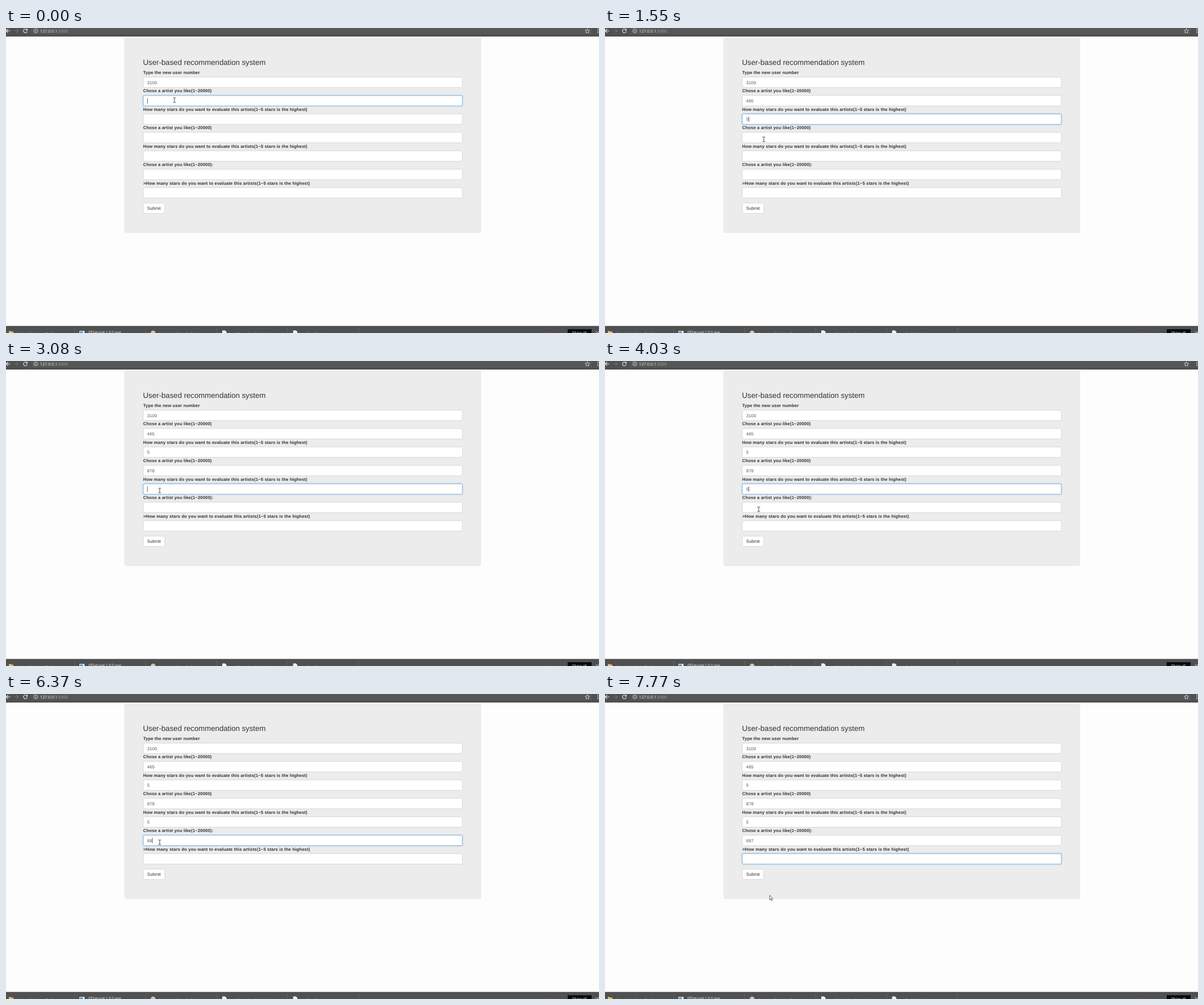
An HTML page for the animation above (8 s loop, 1042x537 px).

```html
<!DOCTYPE html>
<html lang="en">
<head>
<meta charset="utf-8">
<title>Recommendation form</title>
<style>
html, body { margin: 0; width: 100%; height: 100%; overflow: hidden; background: #fdfdfd; }
svg { display: block; width: 100vw; height: 100vh; }
text { font-family: "Liberation Sans", Arial, sans-serif; text-rendering: geometricPrecision; white-space: pre; }
.title { font-size: 13.2px; fill: #333; }
.label { font-size: 7.7px; font-weight: bold; letter-spacing: .115px; fill: #333; }
.value { font-size: 7.7px; letter-spacing: .12px; fill: #555; }
.button { font-size: 7.7px; fill: #333; }
.ui { font-family: "Open Sans", "Noto Sans", sans-serif; }
.url { font-size: 7.2px; fill: #f5f5f5; }
.file { font-size: 6.6px; fill: #f0f0f0; }
.icon { fill: none; stroke: #e6e6e6; stroke-width: 1.1; }
</style>
</head>
<body>
<svg id="stage" viewBox="0 0 1042 537" preserveAspectRatio="none">
  <defs>
    <filter id="blur" x="-5%" y="-50%" width="110%" height="200%"><feGaussianBlur stdDeviation="1"/></filter>
  </defs>
  <rect width="1042" height="537" fill="#fdfdfd"/>

  <g id="toolbar">
    <rect width="1042" height="15" fill="#505050"/>
    <rect x="44.5" y="-4" width="985" height="15" rx="1.5" fill="#575757"/>
    <rect y="14" width="1042" height="1" fill="#484848"/>
    <path class="icon" d="M7.5 5H.5M3.8 1.6L.4 5L3.8 8.4"/>
    <path class="icon" d="M14.5 5H21.5M18.2 1.6L21.6 5L18.2 8.4" style="stroke:#707070"/>
    <path class="icon" d="M36.6 2.8A3.4 3.4 0 1 0 37.4 5.8"/>
    <path d="M38 1V4.6H34.4Z" fill="#e6e6e6"/>
    <circle class="icon" cx="52.3" cy="5" r="3.4" style="stroke-width:.8"/>
    <path class="icon" d="M52.3 4.5V7M52.3 2.8V3.7" style="stroke-width:.9"/>
    <text class="ui url" x="59.8" y="7.7">127.0.0.1<tspan fill="#a6a6a6">:5000</tspan></text>
    <path class="icon" d="M1021.6 1.2L1022.7 3.9L1025.6 4.1L1023.4 6L1024.1 8.8L1021.6 7.3L1019.1 8.8L1019.8 6L1017.6 4.1L1020.5 3.9Z" style="stroke-width:.8"/>
    <g fill="#e6e6e6"><circle cx="1040" cy="2.2" r=".9"/><circle cx="1040" cy="5.1" r=".9"/><circle cx="1040" cy="8" r=".9"/></g>
  </g>

  <rect x="208" y="16" width="627" height="345" rx="4" fill="#ececec"/>
  <text class="title" x="240.8" y="64.5">User-based recommendation system</text>
  <g id="form"></g>
  <rect x="241.2" y="308.3" width="37.8" height="18.2" rx="2" fill="#fff" stroke="#ccc" stroke-width=".7"/>
  <text class="button" x="248" y="320.2">Submit</text>

  <g id="shelf">
    <rect y="525" width="1042" height="12" fill="#505050"/>
    <rect y="524.6" width="1042" height=".8" fill="#444"/>
    <path d="M5 537V533.5H8.5L9.5 534.5H13V537Z" fill="#e9bf62"/>
    <rect x="129" y="533.3" width="9" height="4" fill="#e4edf4"/>
    <rect x="130" y="534.5" width="5" height="2.5" fill="#4a8fc9"/>
    <circle cx="258.5" cy="537" r="4.2" fill="#cfc6ad"/>
    <path d="M380 537V532.6H385L387.5 535V537ZM504.5 537V532.6H509.5L512 535V537Z" fill="#f4f4f4"/>
    <circle cx="947" cy="537.6" r="1.5" fill="#b8384c"/>
    <rect x="987" y="530.3" width="42" height="7" fill="#0a0a0a"/>
    <text class="ui file" x="995" y="539.3" style="fill:#fff">Show all</text>
    <path class="icon" d="M1036.5 534L1042 539.5M1042 534L1036.5 539.5" style="stroke-width:.9"/>
  </g>

  <rect id="caret" width=".9" height="9.4" fill="#555"/>
  <g id="beam" fill="none" stroke="#333" stroke-width=".9">
    <path d="M-2.4 -4H-.6L0 -3.5L.6 -4H2.4M0 -3.5V3.5M-2.4 4H-.6L0 3.5L.6 4H2.4"/>
  </g>
  <path id="arrow" d="M.3 .4V8.6L2.2 6.9L3.5 9.7L4.7 9.1L3.4 6.3H5.9Z" fill="#fff" stroke="#222" stroke-width=".7"/>
</svg>
<script>
const LOOP = 8000, PITCH = 32.43, FADE = 115;
const $ = id => document.getElementById(id);

function add(parent, tag, attrs, text = "") {
  const el = document.createElementNS("http://www.w3.org/2000/svg", tag);
  for (const key in attrs) el.setAttribute(key, attrs[key]);
  el.textContent = text;
  parent.append(el);
  return el;
}

const artist = "Chose a artist you like(1~20000)";
const stars = "How many stars do you want to evaluate this artists(1~5 stars is the highest)";
const labels = ["Type the new user number", artist, stars, artist, stars, artist + ":", ">" + stars];
const rowY = i => 95.6 + PITCH * i;

const rows = labels.map((label, i) => {
  const y = rowY(i), form = $("form");
  const box = { x: 241.1, y: y - 9.1, width: 560.8, height: 18.3, rx: 2 };
  add(form, "text", { class: "label", x: 241, y: y - 14.6 }, label);
  const glow = add(form, "rect", { ...box, fill: "none", stroke: "#66afe9", "stroke-width": 1.5, filter: "url(#blur)" });
  add(form, "rect", { ...box, fill: "#fff", stroke: "#ccc", "stroke-width": .7 });
  const ring = add(form, "rect", { ...box, fill: "none", stroke: "#66afe9", "stroke-width": .7 });
  const value = add(form, "text", { class: "value", x: 248, y: y + 2.9 });
  return { glow, ring, value };
});

const files = [[18, "dataset_backup_final"], [145, "FFSetup4.1.0.0.exe"], [270, "lecture_slides_draft"],
  [393, "weekly_tasks_sheet.txt"], [516, "reading_list_notes"]];
files.forEach(([x, name], i) => {
  add($("shelf"), "text", { class: "ui file", x, y: i === 1 ? 538.1 : 541.4 }, name);
  add($("shelf"), "rect", { x: 120 + 124.8 * i, y: 527.5, width: .8, height: 9.5, fill: "#6a6a6a" });
});

// [time, row, typed text]
const typing = [[0, 0, "3100"], [150, 1, "4"], [440, 1, "46"], [580, 1, "465"], [1550, 2, "5"],
  [2380, 3, "8"], [2520, 3, "87"], [2660, 3, "878"], [3770, 4, "5"],
  [6090, 5, "6"], [6370, 5, "68"], [6510, 5, "687"]];
// [time, focused row]
const focus = [[-500, 1], [1010, 2], [1820, 3], [2950, 4], [4300, 5], [6940, 6]];
// [time, caret shown]
const blinks = [[0, 1], [3640, 0], [3770, 1], [4830, 0], [5380, 1], [5810, 0], [6090, 1], [7490, 0]];
// [time, x, y, pointer shape]
const moves = [[0, 296, 127, "beam"], [720, 289, 142, "arrow"], [870, 283, 160, "beam"], [1290, 281, 166, "beam"],
  [1430, 278, 182, "arrow"], [1550, 279, 196, "beam"], [2810, 274, 211, "arrow"], [2950, 270, 228, "beam"],
  [3900, 269, 244, "arrow"], [4030, 270, 261, "beam"], [6650, 271, 275, "arrow"], [6800, 275, 291, "beam"],
  [7220, 279, 294, "beam"], [7370, 283, 304, "arrow"], [7490, 287, 330, "arrow"], [7630, 288, 346, "arrow"],
  [7770, 289, 354, "arrow"]];

const latest = (list, t) => list.filter(step => step[0] <= t).pop();

function draw(t) {
  const [since, active] = latest(focus, t);
  const fade = t - since < FADE ? .5 : 1;
  rows.forEach(({ glow, ring, value }, i) => {
    const level = i === active ? fade : i === active - 1 ? 1 - fade : 0;
    glow.setAttribute("opacity", level * .5);
    ring.setAttribute("opacity", level);
    const typed = latest(typing.filter(step => step[1] === i), t);
    value.textContent = typed ? typed[2] : "";
  });

  const caret = $("caret");
  caret.setAttribute("x", 248 + 4.4 * rows[active].value.textContent.length);
  caret.setAttribute("y", rowY(active) - 4.5);
  caret.setAttribute("opacity", latest(blinks, t)[1]);

  const [, x, y, shape] = latest(moves, t);
  for (const id of ["beam", "arrow"]) {
    $(id).setAttribute("transform", `translate(${x} ${y})`);
    $(id).setAttribute("visibility", id === shape ? "visible" : "hidden");
  }
}

const start = performance.now();
function tick() {
  draw((performance.now() - start) % LOOP);
  requestAnimationFrame(tick);
}
tick();
</script>
</body>
</html>
```
